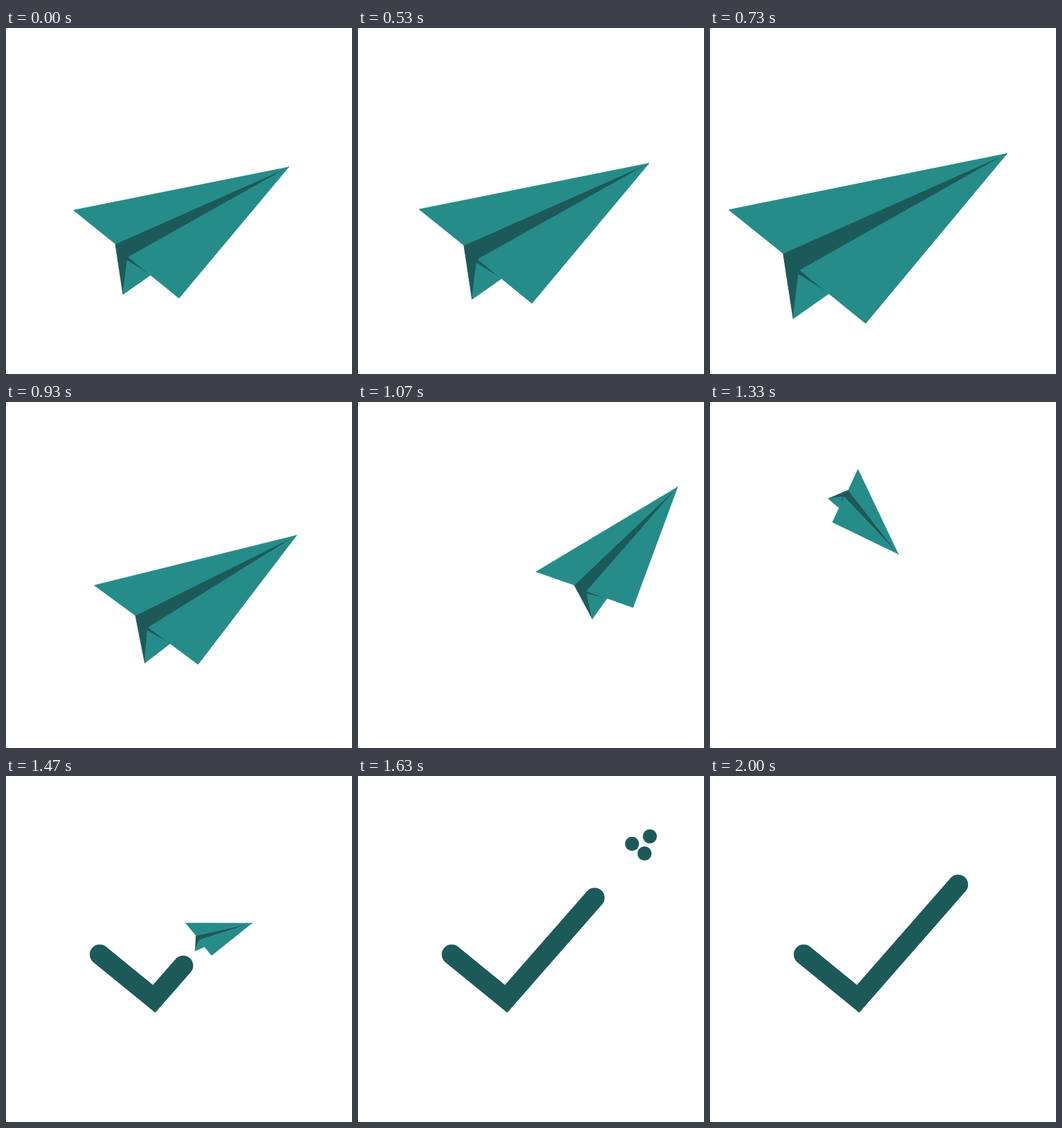
An HTML page for the animation above (2510 ms loop, 500 by 500 pixels).

```html
<!DOCTYPE html>
<html lang="en">
<head>
<meta charset="utf-8">
<title>Paper plane to check mark</title>
<style>
  html, body { margin: 0; height: 100%; overflow: hidden; background: #fff; }
  svg { display: block; width: 100vw; height: 100vh; }
  .dark { fill: #1c5a59; stroke: #1c5a59; }
  .light { fill: #258c89; stroke: #258c89; }
  #plane { stroke-width: .8; stroke-linejoin: bevel; }
  #dots { stroke: none; }
  #check { fill: none; stroke: #1c5a59; stroke-width: 29; stroke-linecap: round; stroke-miterlimit: 10; }
</style>
</head>
<body>
<svg viewBox="0 0 500 500">
  <path id="check" pathLength="1" d="M135.5 258 L214 322 L358.5 157"/>
  <g id="dots" class="dark"><circle/><circle/><circle/></g>
  <g id="plane">
    <path class="dark" d="M158 312 L408.5 201 L177 331 L208 356.5 L175 337 L169 385Z"/>
    <path class="light" d="M97.5 263.3 L408.5 201 L158 312Z"/>
    <path class="light" d="M175 336 L169 385 L209 357Z"/>
    <path class="light" d="M177 331 L408.5 201 L250 390.5Z"/>
  </g>
</svg>
<script>
const LOOP = 2510, STEP = 100 / 3;
const LAND = 47; // step at which the plane bursts into dots
const [plane, check, dots] = ['plane', 'check', 'dots'].map(id => document.getElementById(id));

// Flight path: step, x, y
const path = [
  [16, 231, 282], [21, 197, 287], [28, 255, 277], [31, 335, 250], [35, 397, 132],
  [37.5, 318, 76], [40, 220, 154.5], [44, 298, 226], [LAND, 395, 114]
];
const drift = [[2, -31], [52, -52], [37, -4]];

const clamp = v => Math.min(1, Math.max(0, v));
const easeOut = u => 1 - (1 - u) ** 3;
const show = (el, on) => el.style.display = on ? '' : 'none';

// Smooth curve through unevenly spaced points
function pathAt(k) {
  const last = path.length - 1;
  let i = 0;
  while (i < last - 1 && k >= path[i + 1][0]) i++;
  const a = path[i], b = path[i + 1];
  const before = path[Math.max(0, i - 1)], after = path[Math.min(last, i + 2)];
  const h = b[0] - a[0], u = clamp((k - a[0]) / h);
  return [1, 2].map(j => {
    const m = (b[j] - before[j]) / (b[0] - before[0]) * h;
    const n = (after[j] - a[j]) / (after[0] - a[0]) * h;
    const d = b[j] - a[j];
    return a[j] + u * (m + u * (3 * d - 2 * m - n + u * (m + n - 2 * d)));
  });
}

// One full turn to the left, slow at both ends
const angleAt = k => -360 / (1 + Math.exp(0.522 * (37.47 - k)));

// Swells steadily, then shrinks into the distance
const scaleAt = k => Math.min(1 + 0.068 * Math.max(0, k - 15), 0.045 + 0.00076 * (62.5 - k) ** 2);

function draw(k) {
  plane.setAttribute('transform',
    `translate(${pathAt(k)}) rotate(${angleAt(k)}) scale(${scaleAt(k)}) translate(-231 -282)`);
  show(plane, k < LAND);

  const drawn = easeOut(clamp((k - 41) / 14));
  show(check, drawn);
  check.setAttribute('stroke-dasharray', drawn < 1 ? `${drawn} 2` : 'none');

  const u = clamp((k - LAND + 1) / 14), e = easeOut(u);
  const [, x, y] = path[path.length - 1];
  show(dots, k >= LAND && u < 1);
  drift.forEach(([dx, dy], i) => {
    const dot = dots.children[i];
    dot.setAttribute('cx', x + dx * e);
    dot.setAttribute('cy', y + dy * e);
    dot.setAttribute('r', 13 * (1 - u));
  });
}

const start = performance.now();
function tick() {
  const t = (performance.now() - start) % LOOP;
  draw(Math.floor((t + 4) / STEP));
  requestAnimationFrame(tick);
}
tick();
</script>
</body>
</html>
```
